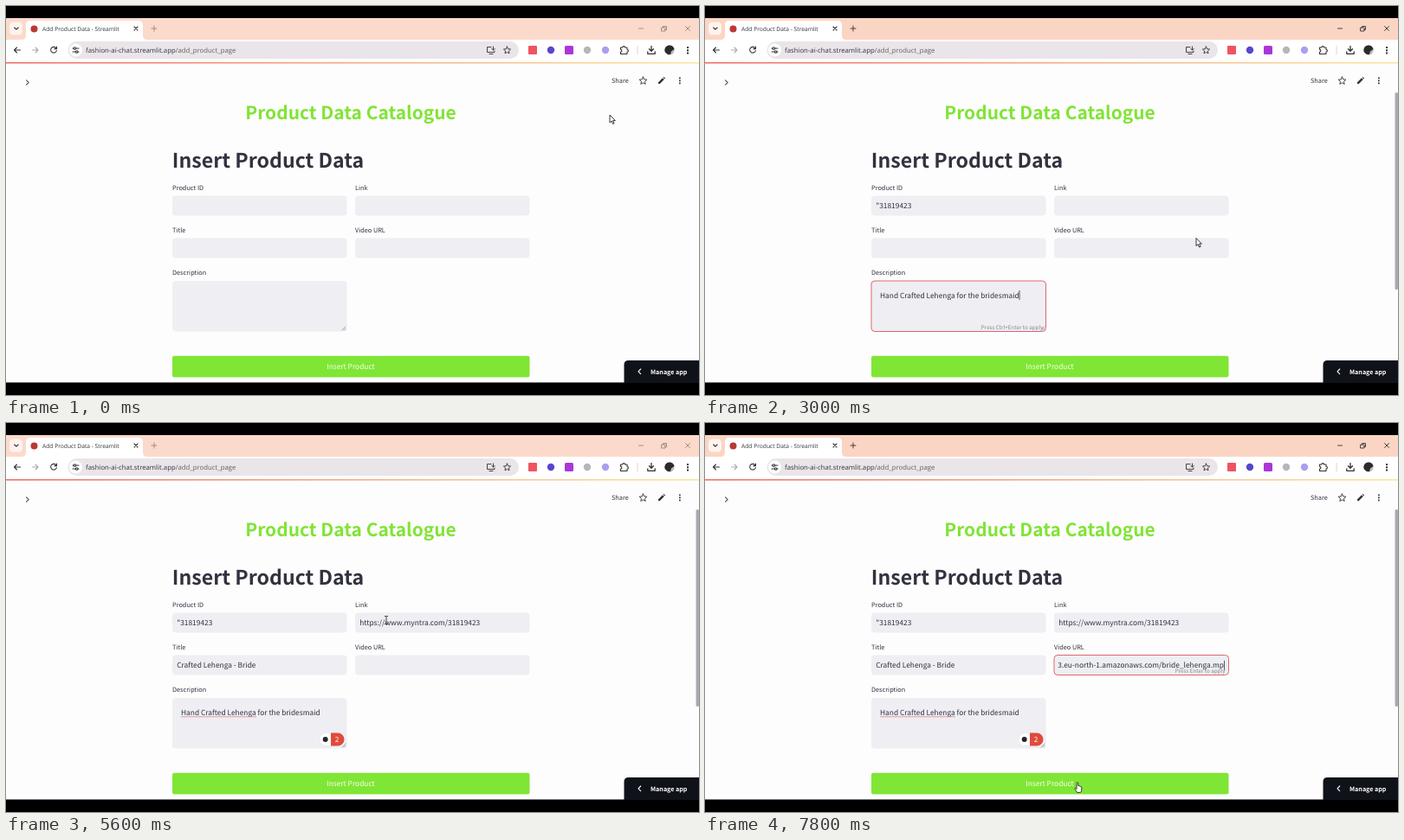
An HTML page that plays this animation: 800x450 px, repeating every 8000 ms.

```html
<!DOCTYPE html>
<html lang="en">
<head>
<meta charset="utf-8">
<title>Product form</title>
<style>
html, body { margin: 0; width: 100%; height: 100%; overflow: hidden; background: #000; }
svg { display: block; width: 800px; height: 450px; }
text { font: 8.4px "Noto Sans CJK JP", "Noto Sans CJK SC", "Noto Sans CJK", sans-serif; fill: #31333f; text-rendering: geometricPrecision; }
.label { font-size: 7.33px; }
.hint { font-size: 6.25px; fill: #85868f; text-anchor: end; }
.ui { font-family: "Open Sans", "Noto Sans", sans-serif; }
.line { fill: none; stroke: #333; stroke-width: 1.1; stroke-linecap: round; stroke-linejoin: round; }
.box { fill: #eeeef3; stroke-width: 1; }
</style>
</head>
<body>
<svg viewBox="0 0 800 450">
  <defs>
    <linearGradient id="stripe"><stop stop-color="#ef6a62"/><stop offset="1" stop-color="#f8e6a0"/></linearGradient>
    <clipPath id="urlClip"><path d="M407 268h193v24h-193z"/></clipPath>
  </defs>
  <path fill="#fefdfe" d="M0 14h800v421.5H0z"/>

  <!-- tab strip -->
  <path id="strip" d="M0 14h800v25H0z"/>
  <rect x="4" y="18.500" width="15" height="15" rx="4.500" fill="#fef3ee"/>
  <path class="line" d="M9.700 25l2.200 2.200 2.200-2.200"/>
  <path fill="#fff" d="M18 39q5 0 5-5V22q0-5 5-5h125q5 0 5 5v12q0 5 5 5z"/>
  <circle cx="32.500" cy="26.500" r="4" fill="#b93a34"/>
  <text class="ui" x="42" y="29" style="font-size:6.700px">Add Product Data - Streamlit</text>
  <path class="line" d="M148 24l4 4m0-4l-4 4"/>
  <path id="controls" class="line" style="stroke-width:.9" d="M168 26h6m-3-3v6M730.500 26h5M757 25h4v4h-4zM758.500 25v-1.500h4v4H761M784.500 23.500l5 5m0-5l-5 5"/>

  <!-- toolbar -->
  <path fill="#fff" d="M0 39h800v26H0z"/>
  <rect x="71.500" y="41" width="520.500" height="20" rx="10" fill="#eae5e8"/>
  <circle cx="80.500" cy="51" r="7.500" fill="#fff"/>
  <path class="line" d="M16.500 51h-7m3-3l-3 3 3 3"/>
  <path class="line" style="stroke:#aaa" d="M30.500 51h6.500m-3-3l3 3-3 3"/>
  <path class="line" d="M58 49a3.400 3.400 0 1 0 .4 2.500M58.500 47v2.600h-2.600"/>
  <path class="line" d="M77 49h1m3 0h3M77 53h3m3 0h1"/>
  <circle class="line" cx="79.400" cy="49" r="1.300"/>
  <circle class="line" cx="81.700" cy="53" r="1.300"/>
  <text class="ui" x="92" y="53.800" style="font-size:7.780px">fashion-ai-chat.streamlit.app<tspan fill="#606166">/add_product_page</tspan></text>
  <path class="line" style="stroke-width:.9" d="M560 47.500h-4.500v6h8.500V52M558 55.500h4M562.500 47v4m-1.800-1.700l1.800 1.800 1.800-1.800"/>
  <path class="line" style="stroke-width:.9" d="M578.500 47l1.200 2.700 2.900.3-2.200 2 .6 2.900-2.500-1.500-2.500 1.500.6-2.900-2.200-2 2.900-.3z"/>
  <rect x="603" y="46" width="10" height="10" rx="1" fill="#ef5360"/>
  <circle cx="629" cy="51" r="4.200" fill="#5646cf"/>
  <rect x="645" y="46" width="10" height="10" rx="1.500" fill="#ab36d8"/>
  <circle cx="671" cy="51" r="4.200" fill="#b4b6ba"/>
  <circle cx="692" cy="51" r="4.200" fill="#a8a0ee"/>
  <path class="line" d="M709.500 48h2.300a1.400 1.400 0 0 1 2.800 0h2.400v2.300a1.400 1.400 0 0 1 0 2.800v2.400h-7.500v-2.400a1.400 1.400 0 0 0 0-2.800z"/>
  <path stroke="#f3cdbd" d="M729 46v10"/>
  <path class="line" style="stroke-width:1.300" d="M745 46.500v5.500m-2.500-2.300l2.500 2.500 2.500-2.500M740.800 53v2.300h8.400V53"/>
  <circle cx="766" cy="51" r="5.700" fill="#bcbcbf"/>
  <path fill="#2b2a2d" d="M761 53.500a5.500 5.500 0 0 1 10-5q1 2-1 2.500l-2 1.500-1 3.500h-3z"/>
  <path fill="#333" d="M786 47h2v2h-2zm0 3.200h2v2h-2zm0 3.200h2v2h-2z"/>

  <!-- page -->
  <path fill="url(#stripe)" d="M0 65h800v1.500H0z"/>
  <path class="line" style="stroke:#555" d="M23.500 85.800l2.700 2.700-2.700 2.700"/>
  <text class="label" x="699" y="89">Share</text>
  <path class="line" style="stroke-width:.9" d="M735.500 82l1.300 2.900 3.100.3-2.400 2.100.7 3.100-2.700-1.600-2.700 1.600.7-3.100-2.400-2.100 3.100-.3z"/>
  <path fill="#31333f" d="M753 90v-1.800l5-5 1.800 1.800-5 5zM758.600 82.600l.8-.7 1.800 1.800-.8.700z"/>
  <path fill="#31333f" d="M777 82.500h1.700v1.700H777zm0 3h1.700v1.700H777zm0 3h1.700v1.700H777z"/>
  <text x="276.300" y="131" style="font-size:20.930px;font-weight:700;fill:#80e435">Product Data Catalogue</text>
  <text x="191.800" y="187" style="font-size:23.150px;font-weight:700">Insert Product Data</text>
  <g id="form"></g>
  <path class="line" style="stroke:#777;stroke-width:.6" d="M388 375l4-4m-1.800 4l1.800-1.800"/>
  <g id="checker">
    <path stroke="#e2858a" stroke-width=".8" d="M202 339.800h87"/>
    <rect x="362" y="358.500" width="28" height="15" rx="7.500" fill="#fff" stroke="#e3e3e7" stroke-width=".6"/>
    <path fill="#e04a3b" d="M375 358.500h8a7.500 7.500 0 0 1 0 15h-8z"/>
    <circle cx="368.700" cy="366" r="3" fill="#252525"/>
    <text x="382" y="369" text-anchor="middle" style="fill:#fff">2</text>
  </g>
  <rect x="192" y="404.800" width="412.500" height="24.700" rx="2.300" fill="#80e635"/>
  <text x="398" y="420" text-anchor="middle" style="fill:#f6fff0">Insert Product</text>
  <rect id="scrollbar" x="796.500" y="100" width="3.500" height="228" rx="1.500" fill="#a9a9ae"/>
  <path fill="#10121a" d="M713.500 436v-21q0-5 5-5H800v26z"/>
  <path class="line" style="stroke:#fff" d="M732.700 420l-2.700 2.800 2.700 2.800"/>
  <text x="744" y="425.500" style="font-size:7.150px;font-weight:700;fill:#fff">Manage app</text>

  <!-- pointers -->
  <g id="arrow"><path fill="#fff" stroke="#222" stroke-width=".9" stroke-linejoin="round" d="M0 0v9l2.100-1.900 1.500 3.400 1.500-.7-1.500-3.200h2.800z"/></g>
  <g id="beam"><path class="line" style="stroke-width:.9" d="M-1.700-4.500h1.200l.5.500.5-.5h1.200M0-4v8M-1.700 4.500h1.200l.5-.5.500.500h1.200"/></g>
  <g id="hand"><path fill="#fff" stroke="#222" stroke-width=".9" stroke-linejoin="round" d="M-1 5.500V.6q0-1 .9-1t.9 1v3.200q1-.5 1.500.3 1-.4 1.400.5 1.100-.2 1.100.9v2.500q0 2-1.300 3.400H-.5q-.8-1.600-2.500-3.900-.4-1 .4-1.200.7-.1 1.600 1.200z"/></g>
</svg>
<script>
const LOOP = 8000;
const $ = id => document.getElementById(id);
const show = (el, on) => el.style.display = on ? "" : "none";
const within = (t, spans) => spans.some(([a, b]) => t >= a && t < b);

// type: first and last moment of typing; focus: spans with the red border
const fields = [
  { label: "Product ID", x: 192, y: 219.5, text: '"31819423', type: [1100, 1500], focus: [[1000, 1900]] },
  { label: "Link", x: 403, y: 219.5, text: "https://www.myntra.com/31819423", type: [4600, 4900], focus: [[4600, 5500], [6000, 6500]] },
  { label: "Title", x: 192, y: 268.5, text: "Crafted Lehenga - Bride", type: [4300, 4500], focus: [[4300, 4600]] },
  { label: "Video URL", x: 403, y: 268.5, text: "https://videos.s3.eu-north-1.amazonaws.com/bride_lehenga.mp", type: [6900, 7600], focus: [[6900, LOOP]], clip: "urlClip" },
  { label: "Description", x: 192, y: 318, h: 58.5, text: "Hand Crafted Lehenga for the bridesmaid", type: [2000, 2800], focus: [[1900, 3200]] },
];
const active = [[800, 3200], [4300, 5500], [6000, 6500], [6800, LOOP]];

// time, x, y, shape from that time on
const pointer = [
  [0, 697, 126, "arrow"], [100, 650, 140, "arrow"], [300, 420, 200, "arrow"], [800, 420, 200, "arrow"],
  [1000, 300, 231, "beam"], [1200, 300, 231, ""], [1900, 300, 240, "beam"], [2000, 290, 338, "beam"],
  [2100, 290, 338, ""], [2800, 540, 290, "arrow"], [3000, 567, 268.5, "arrow"], [3200, 560, 268, "arrow"],
  [3700, 345, 276, "beam"], [4000, 331.5, 274, "beam"], [4300, 331.5, 274, ""], [4600, 439, 228, "beam"],
  [6100, 439, 228, "beam"], [6300, 432, 229, "beam"], [6500, 367, 252, "arrow"], [6800, 400, 262, "arrow"],
  [6900, 470, 280, "beam"], [7100, 470, 280, ""], [7600, 450, 380, "arrow"], [7700, 434, 412, "hand"],
  [7800, 430, 416, "hand"], [LOOP, 430, 416, "hand"],
];

function add(parent, tag, attrs, text = "") {
  const el = document.createElementNS("http://www.w3.org/2000/svg", tag);
  for (const key in attrs) el.setAttribute(key, attrs[key]);
  el.textContent = text;
  return parent.appendChild(el);
}

for (const f of fields) {
  const form = $("form"), { x, y, h = 23 } = f;
  f.left = x + (f.h ? 10 : 5.2);
  f.base = y + (f.h ? 19.5 : 14.8);
  add(form, "text", { x, y: y - 7, class: "label" }, f.label);
  f.box = add(form, "rect", { x, y, width: 201.5, height: h, rx: 4, class: "box" });
  f.hint = add(form, "text", { x: f.h ? 390.5 : x + 197.5, y: y + h - 2.3, class: "hint" },
    `Press ${f.h ? "Ctrl+" : ""}Enter to apply`);
  const inner = add(form, "g", f.clip ? { "clip-path": `url(#${f.clip})` } : {});
  f.value = add(inner, "text", { y: f.base });
  f.caret = add(form, "rect", { y: f.base - 8.5, width: .8, height: 11, fill: "#31333f" });
}

function drawField(f, t) {
  const [start, end] = f.type;
  const part = Math.min(1, Math.max(0, (t - start) / (end - start)));
  const focused = within(t, f.focus);
  f.value.textContent = f.text.slice(0, Math.round(part * f.text.length));
  const width = f.value.getComputedTextLength();
  const left = Math.min(f.left, f.x + 196 - width);
  f.value.setAttribute("x", left);
  f.caret.setAttribute("x", left + width);
  f.box.setAttribute("stroke", focused ? "#e0686b" : "none");
  show(f.hint, focused && part > 0);
  show(f.caret, focused && (t < end || (t - end) % 600 < 300));
}

function drawPointer(t) {
  const i = pointer.findIndex(p => p[0] > t);
  const [t0, x0, y0, shape] = pointer[i - 1], [t1, x1, y1] = pointer[i];
  const k = (t - t0) / (t1 - t0);
  for (const id of ["arrow", "beam", "hand"]) show($(id), id === shape);
  if (shape) $(shape).setAttribute("transform", `translate(${x0 + (x1 - x0) * k} ${y0 + (y1 - y0) * k})`);
}

function draw(now) {
  const t = Math.floor(now % LOOP / 100) * 100;
  const on = within(t, active);
  $("strip").setAttribute("fill", on ? "#fbd5c3" : "#fbdacb");
  $("controls").style.stroke = on ? "#333" : "#98847c";
  show($("scrollbar"), t >= 800);
  show($("checker"), t >= 3200);
  for (const f of fields) drawField(f, t);
  drawPointer(t);
}

const begin = performance.now();
function tick() {
  draw(performance.now() - begin);
  requestAnimationFrame(tick);
}
tick();
</script>
</body>
</html>
```
